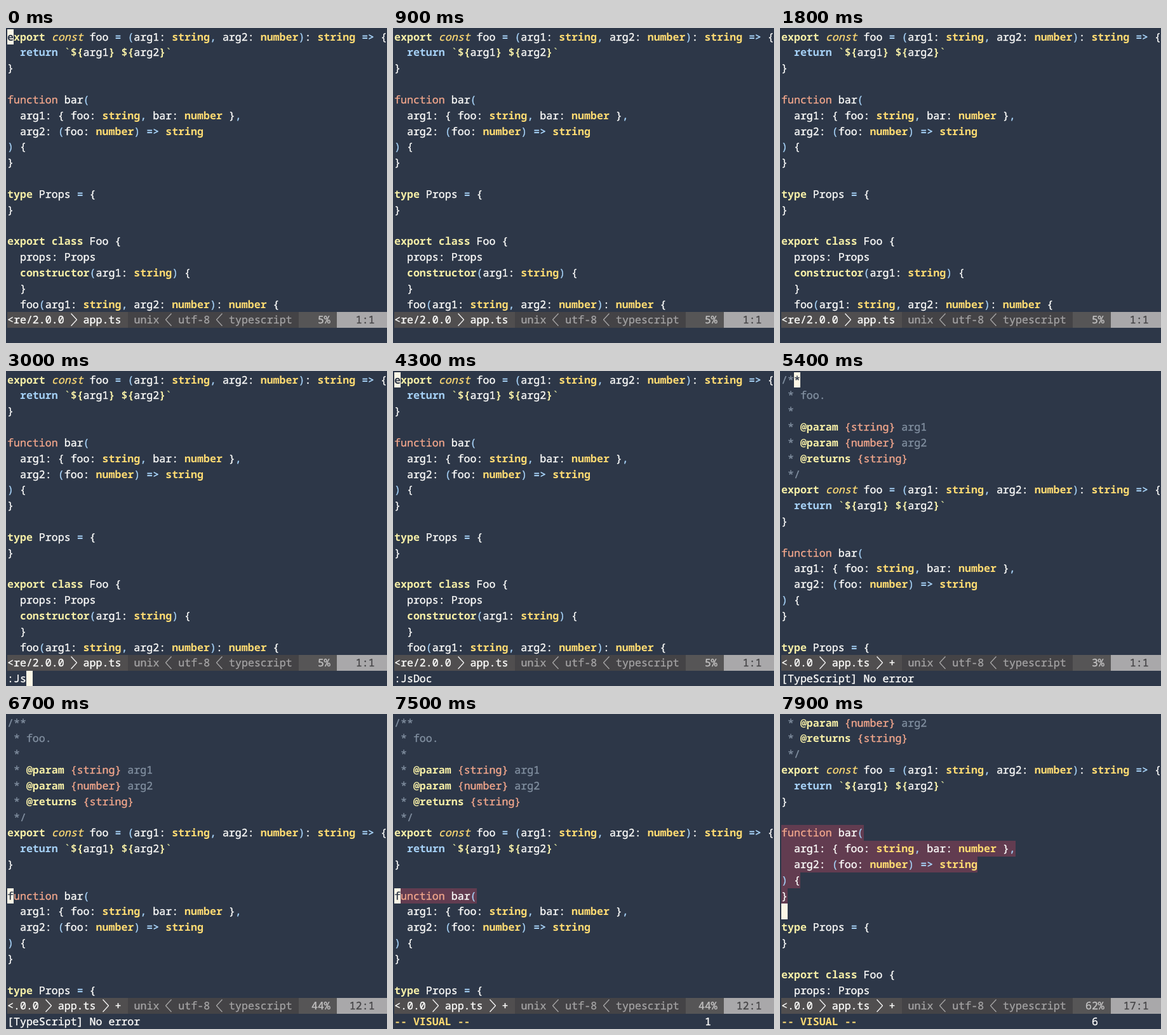
Animation, 600 px wide and 497 px high, one loop 8000 ms. Source, as an HTML page:

```html
<!DOCTYPE html>
<html lang="en">
<head>
<meta charset="utf-8">
<title>Editor session</title>
<style>
  html, body { margin: 0; width: 100%; height: 100%; overflow: hidden; background: #2d3748; }
  #screen {
    position: relative; width: 600px; height: 497px; overflow: hidden; color: #fdfdfb;
    font: 16.63px/24.82px "Noto Sans Mono", "DejaVu Sans Mono", monospace;
    font-variant-ligatures: none; text-rendering: geometricPrecision; white-space: pre;
    -webkit-text-stroke: 0.35px;
  }
  #screen > * { position: absolute; height: 24.82px; }
  .type, .key, .op, b { font-weight: 700; -webkit-text-stroke: 0; }
  .type { color: #fdda72; }
  .key { color: #f4eda6; }
  .const { color: #fcd974; font-style: italic; }
  .func { color: #f3a78c; }
  .op, .punct { color: #a5d0f5; }
  .tick { color: #c9cf94; }
  .note { color: #8290a1; }
  .sel { background: #623c50; }
  .cursor { background: #fcf7e6; color: #2d3748; }
  .file { background: #504e4f; }
  .info { background: #444346; color: #a3a2a3; }
  .pct { background: #565556; color: #c2c1c1; }
  .pos { background: #a9a8aa; color: #454446; }
  svg { fill: none; stroke-width: 1.4; }
</style>
</head>
<body>
<div id="screen"></div>
<script>
const CELL = 9.978, ROW = 24.82, LEFT = 2, TOP = 1.6, LOOP = 8000;
const screen = document.getElementById('screen');

const code = `export const foo = (arg1: string, arg2: number): string => {
  return \`\${arg1} \${arg2}\`
}

function bar(
  arg1: { foo: string, bar: number },
  arg2: (foo: number) => string
) {
}

type Props = {
}

export class Foo {
  props: Props
  constructor(arg1: string) {
  }
  foo(arg1: string, arg2: number): number {
  }
}`.split('\n');

const doc = `/**
 * foo.
 *
 * @param {string} arg1
 * @param {number} arg2
 * @returns {string}
 */`.split('\n');

const rules = [
  ['type', /\b(?:string|number)\b/],
  ['key', /\b(?:export|class|type|constructor)\b|\$\{|\}(?=[ `])/],
  ['const', /\bconst\b/],
  ['func', /\bfunction\b/],
  ['op', /\breturn\b|=>|=/],
  ['punct', /[(),]/],
  ['tick', /`/]
];
const docRules = [['key', /@\w+/], ['func', /\{\w+\}/]];

const span = (cls, text) => `<span class="${cls}">${text.replace(/>/g, '&gt;')}</span>`;

function paint(text, list) {
  const pattern = new RegExp(list.map(([, re]) => `(${re.source})`).join('|'), 'g');
  return text.replace(pattern, (hit, ...groups) => span(list[groups.findIndex(g => g !== undefined)][0], hit));
}

function highlight(line) {
  return /^( \*|\/\*)/.test(line)
    ? `<span class="note">${paint(line, docRules)}</span>`
    : paint(line, rules);
}

// Places markup on the character grid; cols sets a fixed width in cells.
function cell(row, col, html, cls = '', cols = 0) {
  const width = cols ? `;width:${cols * CELL}px` : '';
  return `<div class="${cls}" style="left:${LEFT + col * CELL}px;top:${TOP + row * ROW}px${width}">${html}</div>`;
}

function chevron(col, dir, color) {
  const points = dir > 0 ? '0.5,2.5 9.5,12.2 0.5,22' : '9.5,2.5 0.5,12.2 9.5,22';
  return `<svg width="10" height="25" stroke="${color}" style="left:${LEFT + col * CELL}px;top:${TOP + 18 * ROW}px"><polyline points="${points}"/></svg>`;
}

function statusBar(edited, line, total) {
  const percent = Math.floor(line / total * 100) + '%';
  const light = '#f0f0f0', dim = '#a3a2a3';
  return cell(18, 0, edited ? '&lt;.0.0   app.ts   +' : '&lt;re/2.0.0   app.ts', 'file', 19)
    + cell(18, 19, ' unix   utf-8   typescript', 'info', 27)
    + cell(18, 46, percent.padStart(5), 'pct', 6)
    + cell(18, 52, `${line}`.padStart(4) + ':1', 'pos', 9)
    + (edited ? chevron(6, 1, light) + chevron(15, 1, light) : chevron(10, 1, light))
    + chevron(25, -1, dim) + chevron(33, -1, dim);
}

// Each step changes the editor state from its time onward.
const steps = [
  [0, { line: 1, top: 0, msg: '', row: 0, col: 0 }],
  ...[2400, 2800, 2900, 3200, 3300, 3500].map((at, i) =>
    [at, { msg: ':JsDoc'.slice(0, i + 1), row: 19, col: i + 1 }]),
  [3900, { row: 0, col: 0 }],
  [4400, { edited: true, msg: '[TypeScript] No error', col: 2 }],
  [6400, { line: 11, row: 10, col: 0 }],
  [6600, { line: 12, row: 11 }],
  [7100, { visual: true, msg: '-- VISUAL --' }],
  [7600, { line: 17, row: 12, top: 4 }]
];

function draw(t) {
  const s = Object.assign({}, ...steps.filter(([at]) => at <= t).map(([, change]) => change));
  const lines = s.edited ? doc.concat(code) : code;
  let html = '';
  for (let row = 0; row < 18; row++) {
    const n = row + s.top, text = lines[n] || '';
    const selected = s.visual && n >= 11 && n < s.line;
    html += cell(row, 0, highlight(text), selected ? 'sel' : '');
  }
  html += statusBar(s.edited, s.line, lines.length);
  html += cell(19, 0, s.msg, s.visual ? 'type' : '');
  if (s.visual) html += cell(19, 49, s.line - 11);

  const cursorOn = t >= 5000 || t % 1000 < 500;
  if (cursorOn) {
    const char = s.row < 18 ? (lines[s.row + s.top] || '')[s.col] || '' : '';
    html += cell(s.row, s.col, char === 'e' ? `<b>${char}</b>` : char, 'cursor', 1);
  }
  return html;
}

let shown = '';
function tick(now) {
  const html = draw(now % LOOP);
  if (html !== shown) screen.innerHTML = shown = html;
  requestAnimationFrame(tick);
}
tick(0);
</script>
</body>
</html>
```
